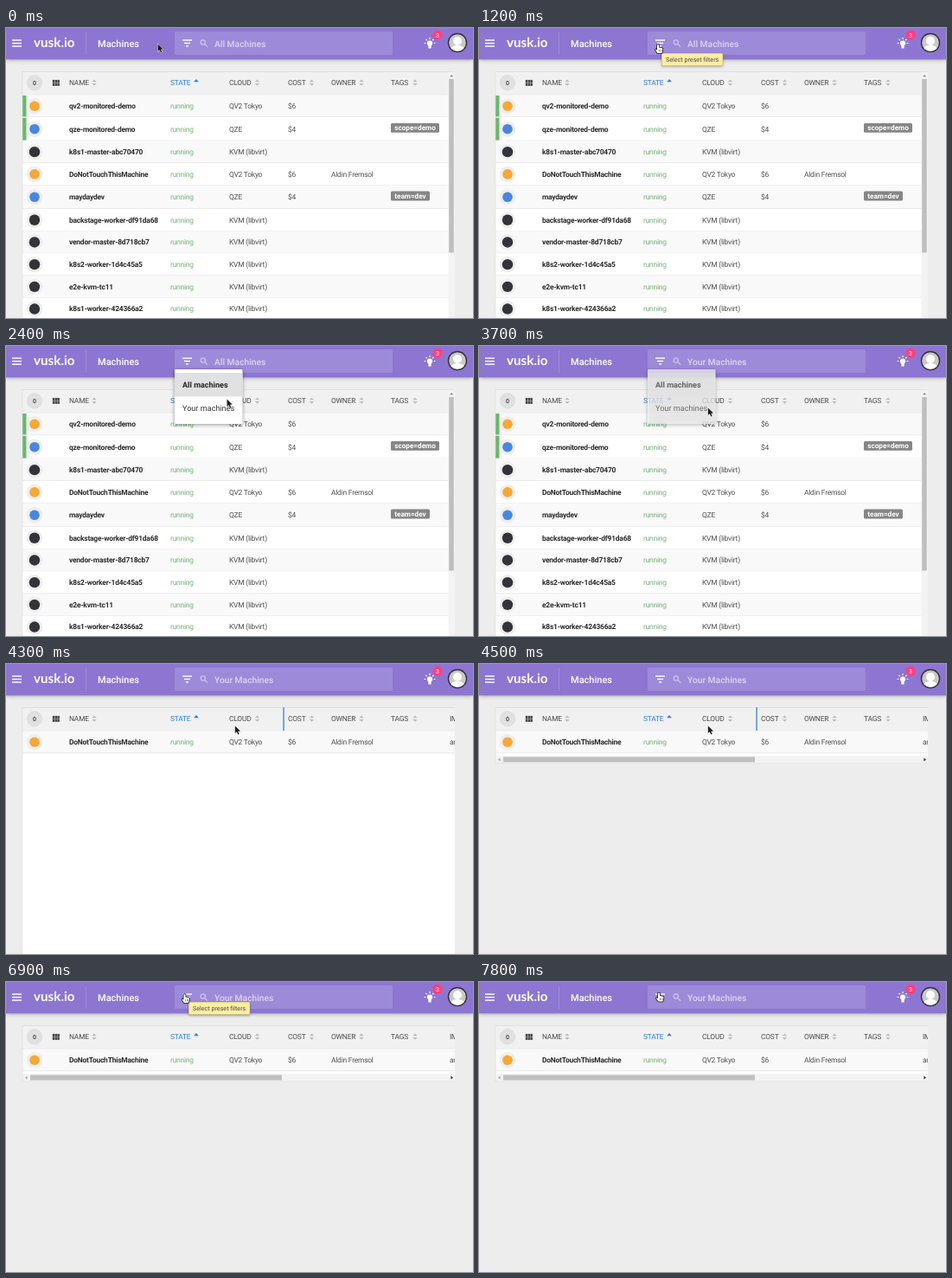
An HTML page with a canvas for the animation above (8000 ms loop, 540 by 335 pixels).

```html
<!DOCTYPE html>
<html lang="en">
<head>
<meta charset="utf-8">
<title>Machines</title>
<style>
html, body { margin: 0; width: 100%; height: 100%; overflow: hidden; background: #ededed; }
canvas { display: block; width: 540px; height: 335px; }
</style>
</head>
<body>
<canvas id="stage"></canvas>
<script>
const W = 540, H = 335, LOOP = 8000, STEP = 100;
const canvas = document.getElementById('stage');
const ratio = window.devicePixelRatio || 1;
canvas.width = W * ratio;
canvas.height = H * ratio;
const ctx = canvas.getContext('2d');
ctx.scale(ratio, ratio);
ctx.textRendering = 'geometricPrecision';

const ORANGE = '#f5a834', BLUE = '#4a86e0', BLACK = '#33343a';
const COL = { name: 73, state: 190, cloud: 258, cost: 326, owner: 376, tags: 445, image: 513 };
const ROW_TOP = 77.4, ROW_H = 25.7, TAGGED_H = 27.2;

const machines = [
  { name: 'qv2-monitored-demo', cloud: 'QV2 Tokyo', icon: ORANGE, cost: '$6', watched: true },
  { name: 'qze-monitored-demo', cloud: 'QZE', icon: BLUE, cost: '$4', tag: 'scope=demo', tagW: 56, watched: true },
  { name: 'k8s1-master-abc70470' },
  { name: 'DoNotTouchThisMachine', cloud: 'QV2 Tokyo', icon: ORANGE, cost: '$6', owner: 'Aldin Fremsol' },
  { name: 'maydaydev', cloud: 'QZE', icon: BLUE, cost: '$4', tag: 'team=dev', tagW: 45 },
  { name: 'backstage-worker-df91da68' },
  { name: 'vendor-master-8d718cb7' },
  { name: 'k8s2-worker-1d4c45a5' },
  { name: 'e2e-kvm-tc11' },
  { name: 'k8s1-worker-424366a2' }
];
const own = machines.filter(m => m.owner);

// Pointer keys: time, x, y
const path = [
  [0, 175.5, 18.5], [100, 175.5, 18.5], [600, 192, 25.5], [1000, 207, 19],
  [1700, 207, 19], [2300, 252, 58.5], [2400, 255.5, 61.5], [3200, 255.5, 61.5],
  [3300, 264.8, 71.5], [4700, 264.8, 71.5], [5600, 208, 22], [5700, 204.5, 13],
  [5800, 204.5, 13], [5900, 206, 13], [6800, 206, 13], [6900, 206.5, 14],
  [7500, 206.5, 14], [7600, 207, 14], [7700, 207, 14], [7800, 208, 12.5], [8000, 208, 12.5]
];

const clamp = v => Math.max(0, Math.min(1, v));
const ease = p => p * p * (3 - 2 * p);

function rect(x, y, w, h, fill) {
  ctx.fillStyle = fill;
  ctx.fillRect(x, y, w, h);
}

function round(x, y, w, h, r, fill) {
  ctx.beginPath();
  ctx.roundRect(x, y, w, h, r);
  ctx.fillStyle = fill;
  ctx.fill();
}

function disc(x, y, r, fill) {
  ctx.beginPath();
  ctx.arc(x, y, r, 0, Math.PI * 2);
  ctx.fillStyle = fill;
  ctx.fill();
}

function poly(points, fill, stroke, width) {
  ctx.beginPath();
  points.forEach(([x, y]) => ctx.lineTo(x, y));
  ctx.closePath();
  if (stroke) {
    ctx.strokeStyle = stroke;
    ctx.lineWidth = width;
    ctx.stroke();
  }
  ctx.fillStyle = fill;
  ctx.fill();
}

function text(str, x, y, size, fill, weight = 400, align = 'left', family = 'Roboto') {
  ctx.font = `${weight} ${size}px ${family}, sans-serif`;
  ctx.textAlign = align;
  ctx.fillStyle = fill;
  ctx.fillText(str, x, y);
}

// Table text is set slightly tight
function cell(str, x, y, fill = '#505050', weight = 400) {
  ctx.letterSpacing = '-0.22px';
  text(str, x, y, 8.45, fill, weight);
  ctx.letterSpacing = '0px';
}

function clipped(x, y, w, h, draw) {
  ctx.save();
  ctx.beginPath();
  ctx.rect(x, y, w, h);
  ctx.clip();
  draw();
  ctx.restore();
}

// Triangle pointing up (dir -1) or down (dir 1)
function caret(x, y, w, h, dir, fill) {
  poly([[x - w, y], [x + w, y], [x, y + h * dir]], fill);
}

function bulb(x, y) {
  disc(x, y - 0.5, 3.1, '#fff');
  rect(x - 1.6, y + 1.5, 3.2, 4, '#fff');
  ctx.strokeStyle = '#fff';
  ctx.lineWidth = 1.2;
  ctx.beginPath();
  for (let i = 0; i < 5; i++) {
    const a = Math.PI * (1 + i / 4), c = Math.cos(a), s = Math.sin(a);
    ctx.moveTo(x + c * 4.6, y - 0.5 + s * 4.6);
    ctx.lineTo(x + c * 6.4, y - 0.5 + s * 6.4);
  }
  ctx.stroke();
}

function avatar(x, y) {
  disc(x, y, 11.2, '#34313d');
  disc(x, y, 9.8, '#c9c9c9');
  ctx.save();
  ctx.beginPath();
  ctx.arc(x, y, 9.8, 0, Math.PI * 2);
  ctx.clip();
  disc(x, y - 2, 5, '#fff');
  ctx.beginPath();
  ctx.ellipse(x, y + 9, 8.6, 6.2, 0, 0, Math.PI * 2);
  ctx.fill();
  ctx.restore();
}

function topBar(query, ripple) {
  ctx.save();
  ctx.shadowColor = 'rgba(0,0,0,.38)';
  ctx.shadowBlur = 5 * ratio;
  ctx.shadowOffsetY = 1 * ratio;
  rect(0, 0, W, 36.3, '#8c76d1');
  ctx.restore();
  for (const y of [13.4, 16.9, 20.4]) rect(7, y, 11, 1.4, '#fff');
  text('vusk.io', 32, 22.3, 15.2, '#fff', 700, 'left', 'Lato');
  rect(92, 5, 1, 26, 'rgba(255,255,255,.16)');
  text('Machines', 106, 21.8, 11, '#fff', 500);

  round(195, 4, 252, 27, 1.5, '#9d8ad8');
  if (ripple) disc(209.5, 17.5, 11.5 * ripple, 'rgba(255,255,255,.2)');
  rect(204, 13.4, 11, 1.4, '#fff');
  rect(206, 16.8, 7, 1.4, '#fff');
  rect(208, 20.2, 3, 1.4, '#fff');
  ctx.strokeStyle = '#cfc6ec';
  ctx.lineWidth = 1.2;
  ctx.beginPath();
  ctx.arc(227.8, 16.5, 2.6, 0, Math.PI * 2);
  ctx.moveTo(229.7, 18.4);
  ctx.lineTo(233, 21.7);
  ctx.stroke();
  text(query, 241, 21.6, 10.25, '#ddd6f2', 500);

  bulb(490, 18);
  disc(499, 8.2, 5.8, '#ff4081');
  text('3', 499, 10.7, 7, '#fff', 400, 'center');
  avatar(522, 17);
}

function tableHead(resizing) {
  rect(19, 50, 500, 27.4, '#f1f1f1');
  rect(19, 50, 500, 0.8, '#dcdcdc');
  rect(19, 76.8, 500, 0.8, '#dedede');
  disc(33, 63.3, 9.2, '#e0e0e0');
  text('0', 33, 65.8, 7, '#333', 500, 'center');
  for (let i = 0; i < 6; i++) {
    rect(53.8 + (i % 3) * 2.8, i < 3 ? 59.9 : 63.5, 2.5, 3.4, '#4a4a4a');
  }
  const heads = [['name', 102], ['state', 220], ['cloud', 290.5], ['cost', 353.5], ['owner', 411], ['tags', 473], ['image', 0]];
  for (const [key, x] of heads) {
    const sorted = key === 'state';
    cell(key.toUpperCase(), COL[key], 66, sorted ? '#2f7de1' : '#4c4c4c');
    if (sorted) {
      caret(x, 62.3, 2.8, 3.2, -1, '#2f7de1');
    } else if (x) {
      caret(x, 62.2, 2.7, 2.8, -1, '#bdbdbd');
      caret(x, 64, 2.7, 2.8, 1, '#bdbdbd');
    }
  }
  if (resizing) rect(320.2, 50, 1.7, 27, '#5b9be6');
}

function row(m, top, h, shaded) {
  const y = top + h / 2, base = y + 2.9;
  rect(19, top, 500, h, shaded ? '#f9f9f9' : '#fff');
  rect(19, top + h - 0.6, 500, 0.7, '#e4e4e4');
  if (m.watched) rect(19, top + 0.6, 4.5, h - 1.3, '#66b96a');
  disc(33, y, 9.2, '#eeeeee');
  disc(33, y, m.icon ? 5.8 : 6.2, m.icon || BLACK);
  cell(m.name, COL.name, base, '#2b2b2b', 700);
  cell('running', COL.state, base, '#76b279');
  cell(m.cloud || 'KVM (libvirt)', COL.cloud, base);
  if (m.cost) cell(m.cost, COL.cost, base);
  if (m.owner) {
    cell(m.owner, COL.owner, base);
    cell('ar', COL.image, base);
  }
  if (m.tag) {
    round(COL.tags, y - 6.7, m.tagW, 10.8, 1.5, '#868686');
    text(m.tag, COL.tags + m.tagW / 2, y + 1.4, 8.2, '#fff', 700, 'center');
  }
}

function rows(list) {
  let top = ROW_TOP;
  list.forEach((m, i) => {
    const h = m.tag ? TAGGED_H : ROW_H;
    row(m, top, h, i % 2 === 0);
    top += h;
  });
}

function fullTable() {
  rect(19, 50, 500, H, '#fff');
  tableHead(false);
  rows(machines);
  rect(511.5, 50.8, 7.5, H, '#f3f3f3');
  rect(512.2, 59, 5.6, 200.5, '#bfbfbf');
  caret(515.2, 56.2, 2, 2.3, -1, '#888');
}

function ownTable(t) {
  const fitted = t >= 4500;
  rect(19, 50, 500, fitted ? 65 : H, '#fff');
  tableHead(t < 4800);
  rows(own);
  if (fitted) {
    rect(19, 106, 500, 9, '#f3f3f3');
    rect(28, 107.4, 291, 6, '#bfbfbf');
    rect(19, 114.5, 500, 0.6, '#dedede');
    poly([[22, 110.4], [24.6, 108.4], [24.6, 112.4]], '#a5a5a5');
    poly([[517, 110.4], [514.4, 108.4], [514.4, 112.4]], '#333');
  }
}

function menu(open, alpha) {
  const h = 63 * open;
  ctx.save();
  ctx.globalAlpha = alpha;
  ctx.shadowColor = 'rgba(0,0,0,.4)';
  ctx.shadowBlur = 4 * ratio;
  ctx.shadowOffsetY = 1 * ratio;
  round(195, 27, 78.5, h, 1, '#fff');
  ctx.shadowColor = 'transparent';
  clipped(195, 27, 78.5, h, () => {
    rect(195, 31, 78.5, 27.4, '#e1e1e1');
    text('All machines', 204, 47.7, 9.05, '#222', 700);
    text('Your machines', 204, 75, 9.1, '#333');
  });
  ctx.restore();
}

function tooltip(y) {
  ctx.save();
  ctx.shadowColor = 'rgba(0,0,0,.3)';
  ctx.shadowBlur = 3 * ratio;
  ctx.shadowOffsetY = 1 * ratio;
  round(211, y, 71.2, 14.8, 1.5, '#c3b470');
  ctx.restore();
  round(211.6, y + 0.6, 70, 13.6, 1, '#fbeea2');
  text('Select preset filters', 246.6, y + 9.9, 7.2, '#4a4a4a', 400, 'center');
}

function arrow(x, y) {
  const shape = [[0, 0], [0, 8.6], [2, 6.8], [3.5, 10], [4.9, 9.4], [3.5, 6.2], [6.2, 6]];
  poly(shape.map(([a, b]) => [x + a, y + b]), '#1c1c1c', '#fff', 1);
}

function hand(x, y) {
  const shape = [[-1, 0.4], [0, 0], [1, 0.4], [1.1, 3.6], [4, 4], [5.4, 4.8], [5.4, 7.2],
    [4.4, 10], [-0.6, 10], [-3, 6.6], [-2.6, 5.4], [-1, 6.4]];
  ctx.lineJoin = 'round';
  poly(shape.map(([a, b]) => [x + a, y + b]), '#fff', '#1c1c1c', 1.6);
  for (const d of [0.8, 2.4, 4]) rect(x + d, y + 6, 0.6, 2.4, '#555');
  ctx.lineJoin = 'miter';
}

function pointer(t) {
  let i = 1;
  while (i < path.length - 1 && path[i][0] < t) i++;
  const [t0, x0, y0] = path[i - 1], [t1, x1, y1] = path[i];
  const p = ease(clamp((t - t0) / (t1 - t0)));
  const x = x0 + (x1 - x0) * p, y = y0 + (y1 - y0) * p;
  (x > 197 && x < 216 && y < 28 ? hand : arrow)(x, y);
}

function draw(t) {
  rect(0, 0, W, H, '#ededed');
  clipped(19, 50, 500, H, () => t < 4200 ? fullTable() : ownTable(t));
  rect(18.6, 50, 0.7, t < 4500 ? H : 65, '#dedede');
  topBar(t < 3700 ? 'All Machines' : 'Your Machines', t >= 1500 && t < 1800 ? clamp((t - 1300) / 400) : 0);
  if (t >= 1600 && t < 3900) {
    const open = ease(clamp((t - 1500) / 400));
    menu(open, Math.min(0.4 + open, 1) * (1 - clamp((t - 3600) / 300)));
  }
  if (t >= 1200 && t < 1500) tooltip(29);
  if (t >= 6100 && t < 7800) tooltip(23);
  pointer(t);
}

const start = performance.now();
function tick() {
  const t = (performance.now() - start) % LOOP;
  draw(Math.floor(t / STEP) * STEP);
  requestAnimationFrame(tick);
}
tick();
</script>
</body>
</html>
```
